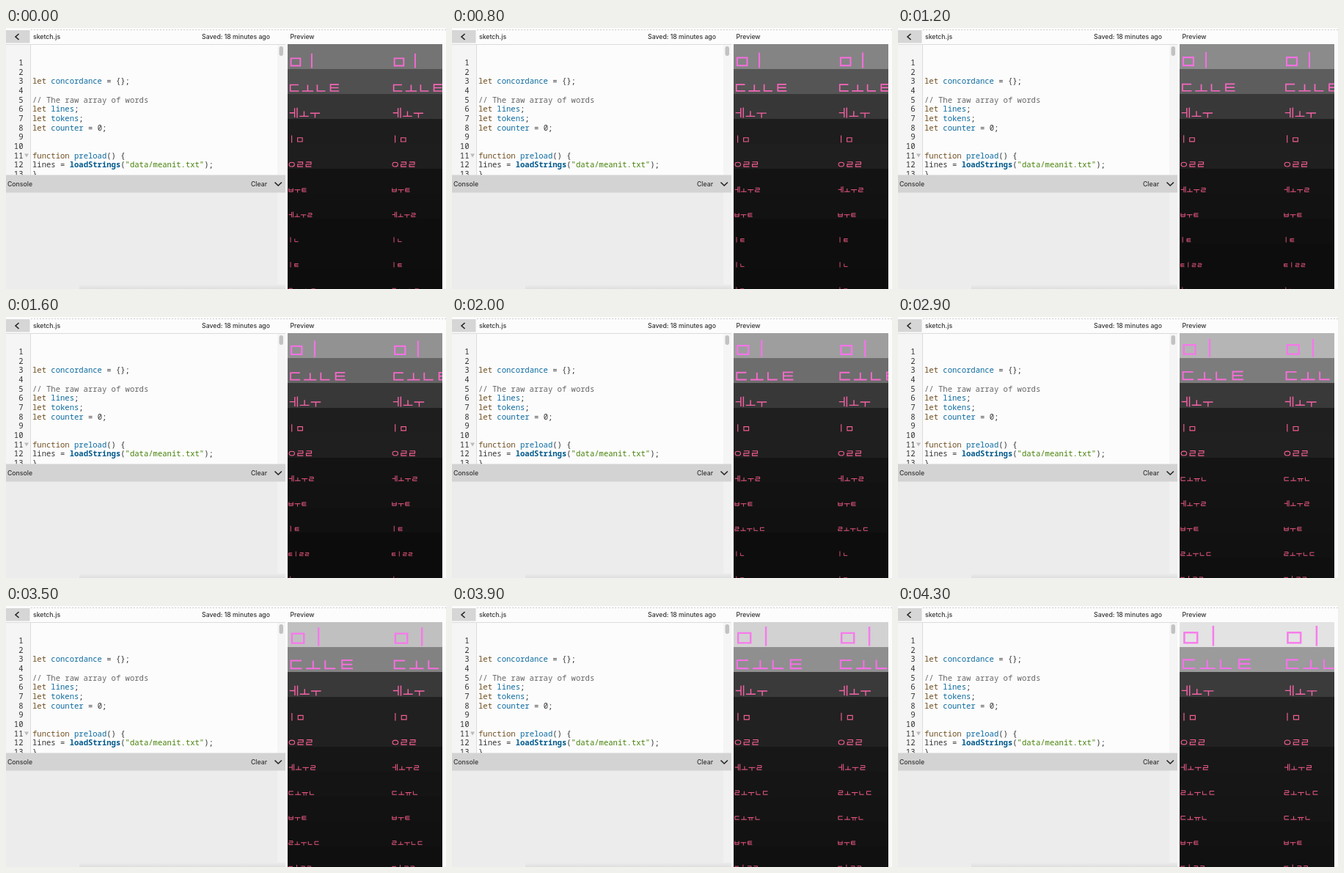
Animation, 600 px wide and 356 px high, one loop 4400 ms. Source, as an HTML page with a canvas:

```html
<!DOCTYPE html>
<html lang="en">
<head>
<meta charset="utf-8">
<title>Concordance sketch</title>
<style>
  html, body { margin: 0; width: 100%; height: 100%; overflow: hidden; background: #fcfcfc; }
  svg, canvas { position: absolute; left: 0; top: 0; display: block; }
  .ui { font: 500 8.7px Inter, sans-serif; fill: #333; }
  .code { font: 10.55px "Noto Sans Mono", monospace; fill: #333; white-space: pre; }
  .kw { fill: #704f21; }
  .id { fill: #0b6a9f; }
  .fn { fill: #00598c; font-weight: 700; }
  .str { fill: #47820a; }
  .note { fill: #666; }
  .icon { fill: none; stroke: #222; stroke-width: 1.6; }
</style>
</head>
<body>
<svg width="600" height="356" viewBox="0 0 600 356">
  <defs>
    <linearGradient id="shade" x1="0" y1="0" x2="0" y2="1">
      <stop offset="0" stop-color="#ececec"/>
      <stop offset="1" stop-color="#dedede"/>
    </linearGradient>
    <clipPath id="editor"><rect y="23" width="381" height="177.5"/></clipPath>
  </defs>
  <rect width="600" height="356" fill="#fcfcfc"/>
  <path d="M34 2.5H600" stroke="#ccc" stroke-dasharray="2 2"/>
  <rect y="3" width="32.5" height="17.5" fill="#d6d6d6"/>
  <path class="icon" d="M17.5 8L13 12l4.500 4"/>
  <text class="ui" x="37" y="15.300">sketch.js</text>
  <text class="ui" x="360" y="15.300" text-anchor="end">Saved: 18 minutes ago</text>
  <text class="ui" x="387.500" y="15.300">Preview</text>

  <rect y="22" width="33" height="179" fill="#f5f5f5"/>
  <path d="M0 22.500H381M33.500 22V201" stroke="#dcdcdc"/>
  <rect x="370" y="23" width="11" height="178" fill="#f5f5f5"/>
  <rect x="372.500" y="25" width="5.500" height="13" rx="2.700" fill="#c2c2c2"/>
  <path d="M25 171.500h6l-3 5z" fill="#bbb"/>
  <g id="lines" class="code" clip-path="url(#editor)"></g>

  <rect y="224" width="381" height="132" fill="#ececec"/>
  <rect x="370" y="224" width="11" height="132" fill="#f1f1f1"/>
  <rect x="100" y="350" width="281" height="6" fill="url(#shade)"/>
  <rect y="200.500" width="381" height="24" fill="#d3d3d3"/>
  <text class="ui" x="2" y="216">Console</text>
  <text class="ui" x="334" y="216">Clear</text>
  <path class="icon" d="M366.500 210.500l4.700 4.500l4.700-4.500"/>
</svg>
<canvas id="preview" width="600" height="356"></canvas>

<script>
// Editor text: each line is a list of [class, text] pieces.
const code = {
  3: [["kw", "let "], ["id", "concordance"], ["", " = {};"]],
  5: [["note", "// The raw array of words"]],
  6: [["kw", "let "], ["id", "lines"], ["", ";"]],
  7: [["kw", "let "], ["id", "tokens"], ["", ";"]],
  8: [["kw", "let "], ["id", "counter"], ["", " = 0;"]],
  11: [["kw", "function "], ["id", "preload"], ["", "() {"]],
  12: [["", "  lines = "], ["fn", "loadStrings"], ["", "("], ["str", "\"data/meanit.txt\""], ["", ");"]],
  13: [["", "}"]]
};

function addText(x, y, anchor, pieces) {
  const text = document.createElementNS(lines.namespaceURI, "text");
  text.setAttribute("x", x);
  text.setAttribute("y", y);
  text.setAttribute("text-anchor", anchor);
  for (const [name, content] of pieces) {
    const span = document.createElementNS(lines.namespaceURI, "tspan");
    span.setAttribute("class", name);
    span.textContent = content;
    text.append(span);
  }
  lines.append(text);
}

const lines = document.getElementById("lines");
for (let n = 1; n <= 13; n++) {
  const y = 76.4 + (n - 3) * 12.67;
  addText(23.5, y, "end", [["", String(n)]]);
  if (code[n]) addText(36, y, "start", code[n]);
}

// Monoline letters, one unit per advance, centred on x, standing on y = 0.
const strokes = {
  ㅁ: "M-.29-.14h.58v-.46h-.58z",
  ㅣ: "M0 0v-.9",
  ㄷ: "M.32-.6h-.62v.46h.64",
  ㅗ: "M-.42-.14h.84M0-.14v-.46",
  ㅜ: "M-.44-.42h.88M0-.42v.42",
  ㅠ: "M-.44-.42h.88M-.16-.42v.42M.16-.42v.42",
  ㄴ: "M-.29-.62v.48h.6",
  ㅌ: "M.32-.62h-.62v.48h.64M-.3-.38h.6",
  ㅔ: "M-.32-.45h.46M.14-.03v-.85M.37 0v-.91",
  ㅇ: "M-.32-.38a.32.25 0 1 1 .64 0a.32.25 0 1 1-.64 0z",
  ㄹ: "M-.3-.67h.6v.27h-.6v.28h.64",
  ㅂ: "M-.3-.66v.52h.6v-.52M-.3-.4h.6"
};
const glyphs = {};
for (const letter in strokes) glyphs[letter] = new Path2D(strokes[letter]);

const leaders = "ㅁㅣ ㄷㅗㄴㅌ ㅔㅗㅜ ㅣㅁ ㅇㄹㄹ ";
// [ms, weight of each row, words below the leaders]
const ranking = [
  [0, [118, 82, 55, 31, 32, 20, 18.5, 16, 16, 15], "ㅂㅜㅌ ㅔㅗㅜㄹ ㅣㄴ ㅣㅌ ㄹㅗㅜㄴㄷ"],
  [800, [134, 87, 57, 31, 33, 21, 20, 16, 16, 15], "ㅔㅗㅜㄹ ㅂㅜㅌ ㅣㅌ ㅣㄴ ㅣㄷ"],
  [1600, [148, 103, 58, 32, 33, 21, 20, 18, 14, 14], "ㅔㅗㅜㄹ ㅂㅜㅌ ㅣㅌ ㅌㅣㄹㄹ ㅣㄴ"],
  [2400, [172, 118, 58, 33, 33, 22, 20, 19, 16, 15], "ㅔㅗㅜㄹ ㅂㅜㅌ ㄹㅗㅜㄴㄷ ㅣㄴ ㅣㅌ"],
  [2900, [183, 126, 59, 33, 34, 22, 21, 20, 19, 17], "ㄷㅗㅠㄴ ㅔㅗㅜㄹ ㅂㅜㅌ ㄹㅗㅜㄴㄷ ㅌㅣㄹㄹ"],
  [3500, [194, 132, 59, 34, 34, 24, 22, 20, 19, 17], "ㅔㅗㅜㄹ ㄷㅗㅠㄴ ㅂㅜㅌ ㄹㅗㅜㄴㄷ ㅌㅣㄹㄹ"],
  [4300, [229, 157, 61, 35, 35, 25, 23.5, 23, 20, 19], "ㅔㅗㅜㄹ ㄹㅗㅜㄴㄷ ㄷㅗㅠㄴ ㅂㅜㅌ ㅌㅣㄹㄹ"]
];

const LOOP = 4400, STEP = 100;
const LEFT = 384, TOP = 22, WIDTH = 211, PITCH = 34, COPY = 141;
const ctx = document.getElementById("preview").getContext("2d");

function stateAt(time) {
  let i = 0;
  while (i < ranking.length - 2 && time >= ranking[i + 1][0]) i++;
  const [t0, from, before] = ranking[i];
  const [t1, to, after] = ranking[i + 1];
  const p = (time - t0) / (t1 - t0);
  return {
    weights: from.map((w, k) => w + (to[k] - w) * p),
    words: (leaders + (p < 0.5 ? before : after)).split(" ")
  };
}

function drawWord(word, x, y, advance) {
  [...word].forEach((letter, i) => {
    ctx.setTransform(advance, 0, 0, advance, x + (i + 0.5) * advance, y);
    ctx.stroke(glyphs[letter]);
  });
  ctx.resetTransform();
}

function drawRow(word, weight, k) {
  const grey = Math.round(weight - 2);
  const y = TOP + k * PITCH;
  ctx.fillStyle = `rgb(${grey}, ${grey}, ${grey})`;
  ctx.fillRect(LEFT, y, WIDTH, PITCH);

  const advance = 2.02 * Math.sqrt(weight);
  ctx.lineWidth = 0.075 + 0.25 / advance;
  ctx.strokeStyle = `rgb(247, ${88 + weight * 0.16}, ${Math.min(236, 122 + weight * 0.75)})`;
  drawWord(word, LEFT, y + 32.5, advance);
  drawWord(word, LEFT + COPY, y + 32.5, advance);
}

function draw() {
  const time = Math.floor(performance.now() % LOOP / STEP) * STEP;
  const { weights, words } = stateAt(time);
  ctx.clearRect(0, 0, 600, 356);
  ctx.save();
  ctx.beginPath();
  ctx.rect(LEFT, TOP, WIDTH, 356 - TOP);
  ctx.clip();
  words.forEach((word, k) => drawRow(word, weights[k], k));
  ctx.restore();
  requestAnimationFrame(draw);
}
draw();
</script>
</body>
</html>
```
